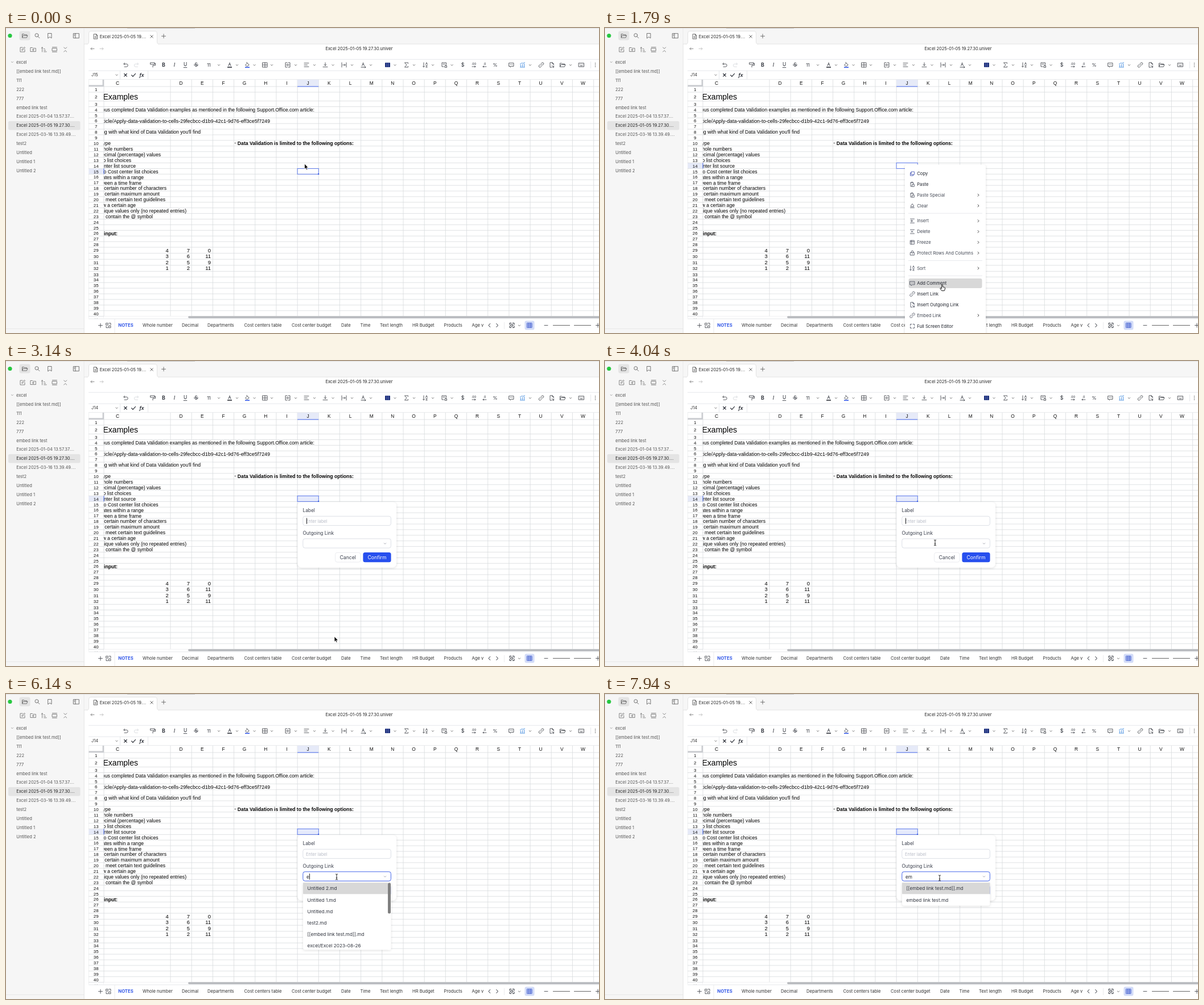
An HTML page that plays this animation: 1042 by 537 pixels, repeating every 8000 ms.

```html
<!DOCTYPE html>
<html lang="en">
<head>
<meta charset="utf-8">
<title>Outgoing link in a sheet</title>
<style>
html, body { margin: 0; width: 100%; height: 100%; overflow: hidden; background: #fff; }
svg { display: block; width: 1042px; height: 537px; font-family: Inter, sans-serif; }
text { white-space: pre; }
.cell { font-family: "Liberation Sans", Arial, sans-serif; }
</style>
</head>
<body>
<svg id="stage" viewBox="0 0 1042 537"></svg>
<script>
const BLUE = '#2f55e8', INK = '#1e222b', GREY = '#444955', GRID = '#d9dbde';

// Drawing helpers; text is placed by its vertical centre.
const text = (x, y, s, size = 7.5, fill = INK, extra = '') =>
  `<text x="${x}" y="${(y + size * 0.36).toFixed(2)}" font-size="${size}" fill="${fill}" ${extra}>${s}</text>`;
const mid = 'text-anchor="middle"', end = 'text-anchor="end"', bold = 'font-weight="700"';
const rect = (x, y, w, h, fill, extra = '') =>
  `<rect x="${x}" y="${y}" width="${w}" height="${h}" fill="${fill}" ${extra}/>`;
const path = (d, stroke = GRID, w = 0.8, extra = '') =>
  `<path d="${d}" fill="none" stroke="${stroke}" stroke-width="${w}" ${extra}/>`;
const icon = (x, y, d, stroke = '#33363d', w = 0.8) =>
  path(d, stroke, w, `transform="translate(${x} ${y})" stroke-linecap="round" stroke-linejoin="round"`);
const group = (id, body, extra = '') => `<g id="${id}" ${extra}>${body}</g>`;

const D = {
  down: 'M-1.7-.8 0 .9 1.7-.8', right: 'M-.9-2 1 0-.9 2', left: 'M1.2-3-1.5 0 1.2 3', next: 'M-1.2-3 1.5 0-1.2 3',
  cross: 'M-2.3-2.3 2.3 2.3M2.3-2.3-2.3 2.3', plus: 'M-3.5 0H3.5M0-3.5V3.5', check: 'M-3.5 0-1 2.5 3.5-2.5',
  back: 'M3 0H-3M-.8-2.2-3 0-.8 2.2', forward: 'M-3 0H3M.8-2.2 3 0 .8 2.2',
  folder: 'M-4.5 3V-3H-1.5L-.5-1.8H3.5V-.5M-4.5 3-3-.5H5L3.5 3Z',
  search: 'M2-1A3 3 0 1 1-4-1 3 3 0 0 1 2-1M1.2 1.2 4 4', mark: 'M-3-4.2H3V4.2L0 2-3 4.2Z',
  panel: 'M-4.8-4H4.8V4H-4.8ZM-1.5-4V4M-3.5-2H-2.8M-3.5 0H-2.8',
  edit: 'M0-3.8H-4V4H4V0M-1 1-.6-1 3.5-4.5 4.5-3.3.8.7Z',
  folderPlus: 'M-4.5-3.5H-1.5L-.5-2.3H4.5V3.5H-4.5ZM0-1V2.2M-1.6.6H1.6',
  order: 'M-3-4V4M-4.5-2.5-3-4-1.5-2.5M0 3.8H4.5M0 1.2H3M0-1.4H1.5',
  box: 'M-4-2.2H4V2.2H-4ZM-4-4.2H4M-4 4.2H4', fold: 'M-2.5-4 0-1.5 2.5-4M-2.5 4 0 1.5 2.5 4',
  file: 'M-3-4.2H1L3.2-2V4.2H-3ZM1-4.2V-2H3.2M-1.4 0H1.5M-1.4 2H1.5',
  undo: 'M-3.5-1.7H1.2a2.5 2.5 0 0 1 0 5H-2.5M-1.7-3.7-3.5-1.7-1.7.2', redo: 'M3.5-1.7H-1.2a2.5 2.5 0 0 0 0 5H2.5M1.7-3.7 3.5-1.7 1.7.2',
  brush: 'M-4-4H3V-1H-4ZM3-2.8H4.5V.8H0V4', bucket: 'M-3.2 0 0-3.4 3.2 0 0 2.3ZM-1.5-4.5 0-3.4',
  border: 'M-4-4H4V4H-4ZM0-4V4M-4 0H4', merge: 'M-1-4H-4V4H-1M1-4H4V4H1M-3 0H-1M3 0H1M0-2V2',
  align: 'M-4-3.2H4M-4 0H1.5M-4 3.2H4', bottom: 'M0-4V1.2M-1.8-.6 0 1.2 1.8-.6M-4 3.6H4',
  flow: 'M-4-4V4M4-4V4M-2.2 0H2.2M.8-1.4 2.2 0 .8 1.4', sum: 'M3-2.6V-4H-3L.5 0-3 4H3V2.6',
  sort: 'M-3-4V3.8M-4.3 2.4-3 3.8-1.6 2.4M.5-.8 2-4.2 3.5-.8M.7 1H3.3L.7 4H3.3',
  filter: 'M3.5-1V-4H-4V3H-1M-2-1.5H1M1 4V1.5H4.5V4ZM3-.8V1.5',
  note: 'M-4-3.3H4V2.4H0L-2 4V2.4H-4ZM-2-.5H-1.7M0-.5H.2M1.8-.5H2', chart: 'M-4 4H4M-3 3V0M0 3V-1M3 3V-2M-4-1.5-1-3.5 1-2.8 4-4.3',
  link: 'M-1 1 1.4-1.4M-.7-2 1-3.6a1.9 1.9 0 0 1 2.7 2.7L2 .8M.7 2-1 3.6a1.9 1.9 0 0 1-2.7-2.7L-2-.8',
  out: 'M0 4.2H-3V-4.2H1L3.2-2V0M1-4.2V-2H3.2M.2 1.2 3.5 4M3.5 1.8V4H1.4', keys: 'M-4.5-3.2H4.5V3.2H-4.5ZM-2.5-1H-2.2M0-1H.2M2.3-1H2.5M-2 1.4H2',
  copy: 'M-1.6-3.5H3.5V1.6H-1.6ZM-1.6-1.6H-3.5V3.5H1.6V1.6', paste: 'M-3-3H2V-.5M-3-3V3.5H-.5M-1.5-4H.6M0 0H3.3V3.8H0Z',
  clear: 'M-2.5 0 0-3.5 2.5 0V1.5H-2.5ZM-3.5 3.5H3.5', insert: 'M-3.5-3.5H3.5M-3.5 3.5H3.5M-3 0H1M-1-1.8V1.8', remove: 'M-3.5-3.5H3.5M-3.5 3.5H3.5M-2-1.2 1 1.2M1-1.2-2 1.2',
  freeze: 'M-3.3-3.3H3.3V3.3H-3.3ZM-1.2-3.3V3.3M-3.3-1.2H3.3', lock: 'M-3.3-.8H3.3V3.8H-3.3ZM-1.8-.8V-2.2a1.8 1.8 0 0 1 3.6 0V-.8M0 1V2',
  full: 'M-1.2-3.5H-3.5V-1.2M1.2-3.5H3.5V-1.2M-3.5 1.2V3.5H-1.2M3.5 1.2V3.5H1.2',
  focus: 'M-1.2-4H-4V-1.2M1.2-4H4V-1.2M-4 1.2V4H-1.2M4 1.2V4H1.2M-1.6-1.6H1.6V1.6H-1.6Z',
  sheets: 'M-4-4H-.8V-.8H-4ZM1-4H4V-.8M-4 1V4H-.8M.8.8H4V4H.8Z'
};

function sidebar() {
  const names = ['[[embed link test.md]]', '111', '222', '777', 'embed link test', 'Excel 2025-01-04 13.57.37....',
    'Excel 2025-01-05 19.27.30....', 'Excel 2025-03-16 13.39.49....', 'test2', 'Untitled', 'Untitled 1', 'Untitled 2'];
  const top = [['folder', 33], ['search', 55], ['mark', 77], ['panel', 123.5]];
  const tools = ['edit', 'folderPlus', 'order', 'box', 'fold'];
  return rect(0, 0, 137, 537, '#f6f6f6') + '<circle cx="7" cy="13.5" r="3.6" fill="#27c840"/>' +
    rect(23.5, 5.5, 19, 16, '#e4e4e4', 'rx="3"') + top.map(([k, x]) => icon(x, 13.7, D[k], '#555')).join('') +
    tools.map((k, i) => icon(29 + i * 18.8, 38, D[k], '#666')).join('') +
    icon(11, 60, D.down, '#999') + text(18, 60, 'excel', 7.5, '#555') +
    rect(4, 164, 126.5, 15.4, '#e4e4e4', 'rx="2.5"') +
    names.map((s, i) => text(18.3, 76.3 + i * 15.88, s, 7.5, i === 6 ? '#222' : '#555')).join('') +
    path('M0 529.5H137', '#e6e6e6') + path('M137.2 0V537', '#dedede');
}

function header() {
  return rect(137.6, 0, 905, 28, '#f6f6f6') +
    '<path d="M142 28.5Q145.5 28.5 145.5 24V9Q145.5 5.5 149 5.5H262Q265.5 5.5 265.5 9V24Q265.5 28.5 269 28.5" fill="#fff" stroke="#dedede" stroke-width=".8"/>' +
    path('M137 28.2H143M268 28.2H1042', '#dedede') + path('M0 .6H1042', '#dcdcdc') + path('M213 .4H332', '#b4b4b4') +
    icon(157.5, 15, D.file, '#444') + text(164.8, 15, 'Excel 2025-01-05 19....', 7.5, '#222') +
    icon(256, 15, D.cross, '#444') + icon(277, 14.3, D.plus, '#555') +
    icon(152, 36.5, D.back, '#777') + icon(168, 36.5, D.forward, '#bbb') +
    text(620.5, 36.5, 'Excel 2025-01-05 19.27.30.univer', 7.5, '#222', mid);
}

function toolbar() {
  const marks = [['undo', 210.5], ['brush', 258], ['bucket', 424], ['border', 455], ['merge', 495], ['align', 528], ['bottom', 561],
    ['flow', 594], ['sum', 703.5], ['sort', 737], ['filter', 770], ['note', 888], ['link', 940.5], ['out', 959], ['folder', 978], ['keys', 1011]];
  const arrows = [374, 406, 436.5, 467, 509, 542, 574.5, 608, 641, 683.5, 717, 750, 783.5, 921, 992];
  return path('M145 55.3H1042M145 75.2H1042M145 90.6H1042M200.5 75V90.6M249.5 75V90.6M1027.5 59V71', '#e0e2e6') +
    marks.map(([k, x]) => icon(x, 65, D[k])).join('') + icon(229, 65, D.redo, '#d4d6da') +
    arrows.map(x => icon(x, 65.3, D.down, '#555')).join('') +
    text(277, 65, 'B', 8.8, INK, mid + ' font-weight="600"') + text(296, 65, 'I', 8.8, INK, mid + ' font-style="italic"') +
    text(315, 64.3, 'U', 8.3, INK, mid) + path('M311.8 69.6H318.2', INK) +
    text(334, 65, 'S', 8.8, INK, mid) + path('M330 65H338', INK) + text(356.3, 65, '11', 7.7, INK, mid) +
    text(393, 64, 'A', 8, INK, mid) + rect(389, 68.3, 8, 1.5, INK) + rect(420, 68.5, 8, 1.6, BLUE) +
    text(627.5, 64.5, 'A', 7.5, INK, mid) + icon(628, 65, 'M-4 4H4M2.7 2.7 4 4 2.7 5.2', INK) +
    rect(666, 61, 9, 8, '#1d2f78', 'rx="1"') + path('M669 61V69M672 61V69', '#a9bbff', 0.5) +
    text(802.5, 65, '$', 8.8, INK, mid) + text(822, 63.2, '.00', 5.3, INK, mid) + icon(822, 68, 'M-3 0H3M1.5-1 3 0 1.5 1', INK, 0.7) +
    text(841, 63.2, '.0', 5.3, INK, mid) + icon(841, 68, 'M3 0H-3M-1.5-1-3 0-1.5 1', INK, 0.7) + text(859.5, 65, '%', 8.2, INK, mid) +
    icon(907.5, 65, D.chart, '#2479d8') +
    [-3, 0, 3].map(d => `<circle cx="1035.5" cy="${65 + d}" r=".7" fill="#444"/>`).join('') +
    icon(194.5, 82.8, D.down, '#555') + icon(210, 82.8, D.cross, INK, 1.1) + icon(224, 82.8, D.check, INK, 1.1) +
    text(238.5, 82.6, '<tspan font-style="italic" font-weight="600">fx</tspan>', 8.5, INK, mid);
}

// Row n spans rowTop(n)..rowTop(n + 1).
const STEP = 9.9, COL = 37.18;
const rowTop = n => n < 2 ? 103 : n < 3 ? 113 : n < 4 ? 128.5 : n <= 29 ? 138.5 + (n - 4) * STEP :
  n <= 33 ? 386 + (n - 29) * 10.6 : 428.4 + (n - 33) * STEP;
const rowMid = n => (rowTop(n) + rowTop(n + 1)) / 2 + 0.3;
const colLeft = i => 289 + i * COL;

function sheet() {
  const notes = [[4, 542, 'various completed Data Validation examples as mentioned in the following Support.Office.com article:'],
    [6, 464, 'article/Apply-data-validation-to-cells-29fecbcc-d1b9-42c1-9d76-eff3ce5f7249', 8.92],
    [8, 342, "along with what kind of Data Validation you'll find"], [10, 184, 'Type'], [11, 223, 'Whole numbers'],
    [12, 272, 'Decimal (percentage) values'], [13, 220, 'to list choices'], [14, 228, 'center list source'],
    [15, 267.5, 'to Cost center list choices'], [16, 242, 'Dates within a range'], [17, 238, 'between a time frame'],
    [18, 282, 'a certain number of characters'], [19, 270, 'a certain maximum amount'], [20, 280, 'to meet certain text guidelines'],
    [21, 228, 'below a certain age'], [22, 317, 'Unique values only (no repeated entries)'], [23, 258, 'to contain the @ symbol']];
  const overflow = [[4, 280, 549], [6, 280, 474.5], [8, 280, 363], [10, 402, 623], [22, 280, 326]];
  const table = [[4, 7, 0], [3, 6, 11], [2, 5, 9], [1, 2, 11]];
  let lines = '', heads = '', body = '';
  for (let n = 1; n < 42; n++) {
    lines += `M145 ${rowTop(n).toFixed(1)}H1042`;
    heads += text(158.3, rowMid(n), n, 8, '#111', mid);
  }
  for (let i = 0; i < 21; i++) {
    lines += `M${colLeft(i).toFixed(1)} 91V508`;
    if (i < 20) heads += text(colLeft(i) + COL / 2, 97.3, String.fromCharCode(68 + i), 8.4, '#111', mid);
  }
  body += overflow.map(([n, a, b]) => rect(a, rowTop(n) + 0.5, b - a, STEP - 1, '#fff')).join('');
  body += text(232, 121, 'Examples', 14, '#000', end);
  body += notes.map(([n, x, s, size = 8.65]) => text(x, rowMid(n), s, size, '#000', end)).join('');
  body += text(611, rowMid(10), '· Data Validation is limited to the following options:', 8.65, '#000', end + bold);
  body += text(196, rowMid(26), 'input:', 8.65, '#000', end + bold);
  table.forEach((r, i) => r.forEach((v, j) => body += text(285.7 + j * COL, rowMid(29 + i) - 0.3, v, 9.4, '#000', end)));
  return '<clipPath id="view"><rect x="172" y="91" width="870" height="417"/></clipPath>' +
    '<clipPath id="sheetBox"><rect x="145" y="91" width="897" height="420.5"/></clipPath>' +
    `<g class="cell" clip-path="url(#sheetBox)">` + path(lines + 'M172 91V511M145 91V511') +
    rect(colLeft(6), 91, COL, 12, '#e6eaf8') + path(`M${colLeft(6)} 103H${colLeft(7)}`, BLUE, 0.9) +
    rect(145.4, 100.4, 26.6, 2.6, '#c9cbcf') + rect(169.6, 91, 2.4, 12, '#c9cbcf') +
    heads + text(196, 97.3, 'C', 8.4, '#111', mid) + `<g clip-path="url(#view)">${body}</g></g>` +
    rect(172, 507.5, 870, 4, '#fff') + rect(320, 507.3, 730, 3.6, '#b9bbbf', 'rx="1.8"');
}

function selection(n) {
  const y = rowTop(n), x = colLeft(6);
  return group('row' + n, rect(145.4, y + 0.4, 26.2, STEP - 0.8, '#e6eaf8') + path(`M172 ${y}v${STEP}`, BLUE, 0.9) +
    text(158.3, rowMid(n), n, 8, '#111', mid + ' class="cell"') +
    rect(x, y, COL, STEP, n === 14 ? 'var(--tint)' : 'none', `stroke="#4f6ee9" stroke-width=".9"`) +
    rect(x + COL - 1.2, y + STEP - 1.2, 2.1, 2.1, BLUE) + text(150, 82.8, 'J' + n, 7.4, '#333'));
}

function footer() {
  const tabs = [[240, 'Whole number'], [309, 'Decimal'], [354, 'Departments'], [418.5, 'Cost centers table'], [502, 'Cost center budget'],
    [589, 'Date'], [622.5, 'Time'], [657, 'Text length'], [714, 'HR Budget'], [769.5, 'Products'], [818.5, 'Age validation']];
  return rect(145, 511.6, 897, 26, '#fff') + path('M145 512H1042', '#e0e2e6') + path('M191 512V537M875.5 518V530', '#e6e7ea') +
    icon(166, 523.7, D.plus) + icon(180, 523.7, D.sheets) + text(210.5, 523.7, 'NOTES', 7.7, BLUE, mid + bold) +
    '<clipPath id="tabs"><rect x="191" y="512" width="648" height="25"/></clipPath>' +
    `<g clip-path="url(#tabs)">${tabs.map(([x, s]) => text(x, 523.7, s, 7.65, '#333')).join('')}</g>` +
    icon(849.5, 523.5, D.left, INK, 1) + icon(863, 523.5, D.next, INK, 1) + icon(889, 523.5, D.focus, INK, 0.9) +
    icon(902, 523.8, D.down, '#555') + rect(911.5, 515.5, 17, 16, '#d3dcf8', 'rx="3"') +
    icon(920, 523.5, 'M-4-4H4V4H-4ZM-4-1.4H4M-4 1.4H4M-1.4-4V4M1.4-4V4', '#2a49c8') +
    icon(949, 523.5, 'M-3 0H3') + path('M961 523.5H991M998 523.5H1028', '#666', 1) + icon(1040, 523.5, D.plus);
}

const ITEMS = [['Copy', 256.5, 'copy'], ['Paste', 275.3, 'paste'], ['Paste Special', 294.2, 'paste', 1], ['Clear', 313, 'clear', 1],
  ['Insert', 339.7, 'insert', 1], ['Delete', 358.5, 'remove', 1], ['Freeze', 377.4, 'freeze', 1], ['Protect Rows And Columns', 396.2, 'lock', 1],
  ['Sort', 422.9, 'sort', 1], ['Add Comment', 449.5, 'note'], ['Insert Link', 468.3, 'link'], ['Insert Outgoing Link', 487.2, 'out'],
  ['Embed Link', 506, 'link', 1], ['Full Screen Editor', 524.9, 'full']];

const panel = 'style="filter:drop-shadow(0 1px 2px rgba(0,0,0,.13))"';

function menu() {
  return group('menu', rect(527, 240.6, 142, 330, '#fff', 'rx="4" ' + panel) +
    rect(533.5, 0, 129, 17, '#d8d8d8', 'id="hover" rx="3"') +
    path('M533 326.3H663M533 409.5H663M533 436.2H663M533 540H663', '#e3e5ea') +
    ITEMS.map(([s, y, k, sub]) => icon(540, y, D[k], k === 'copy' ? '#3b4cb0' : '#3d4252') +
      text(548.2, y, s, 7.7, sub ? GREY : INK) + (sub ? icon(656, y, D.right, '#333', 0.9) : '')).join(''));
}

const field = (y, stroke, id = '') => rect(521.8, y, 154.6, 16.3, '#fff', `${id} rx="3.5" stroke="${stroke}" stroke-width=".9"`);

function dialog() {
  return group('dialog', rect(512.3, 248.2, 173.8, 115.6, '#fff', 'rx="7" ' + panel) +
    text(521.5, 262.8, 'Label', 8.3, '#3a3f4c') + field(273.3, '#d9dce4') + text(527, 281.8, 'Enter label', 7.5, '#b8bcc7') +
    text(521.5, 302.8, 'Outgoing Link', 8.3, '#3a3f4c') + field(312.9, '#d9dce4', 'id="select"') + icon(666, 321.4, D.down, '#9a9fab', 0.9) +
    rect(578.5, 337.3, 44.5, 16.8, '#fff', 'rx="3.5" stroke="#e6e8ed" stroke-width=".8"') + text(600.7, 346, 'Cancel', 8.7, '#3a3f4c', mid) +
    rect(627.4, 336.9, 49.2, 17.4, '#274fee', 'rx="3.5"') + text(652, 346, 'Confirm', 8.7, '#fff', mid) +
    text(528, 321.6, '', 8.2, INK, 'id="typed"') + rect(0, 0, 0.9, 10.5, '#111', 'id="caret"'));
}

const ALL = ['Untitled 2.md', 'Untitled 1.md', 'Untitled.md', 'test2.md', '[[embed link test.md]].md', 'excel/Excel 2023-08-26'];

function list(id, names, h) {
  return group(id, rect(522, 332, 154.4, h, '#fff', 'rx="4" ' + panel) + rect(522, 332.3, 154.4, 20, '#d8d8d8', 'rx="1"') +
    names.map((s, i) => text(529.6, 342.5 + i * 20.15, s, 8.2, '#30343e')).join('') +
    (id === 'all' ? rect(671, 332, 5.4, h, '#fff') + rect(671, 332.5, 5, 43, '#808080', 'id="thumb" rx="2"') : ''));
}

const pointer = (id, d, extra) => `<path id="${id}" d="${d}" ${extra}/>`;
const cursors = pointer('arrow', 'M0 0V9.4L2.1 7.5 3.6 10.8 5.2 10.1 3.7 6.9H6.6Z', 'fill="#000" stroke="#fff" stroke-width=".8"') +
  pointer('hand', 'M-.9 .8a.9.9 0 0 1 1.8 0V4l3.3.8q1 .3.9 1.4L4.5 9.2 3.8 10.8H-.8L-3.4 7.2q-.7-1 .3-1.5l.5 0 1.7 1.4Z', 'fill="#fff" stroke="#000" stroke-width=".9" stroke-linejoin="round"') +
  pointer('beam', 'M-2-5Q0-5 0-3.8Q0-5 2-5M0-3.8V3.8M-2 5Q0 5 0 3.8Q0 5 2 5M-1.2 1.8H1.2', 'fill="none" stroke="#111" stroke-width=".9"');

document.getElementById('stage').innerHTML = rect(0, 0, 1042, 537, '#fff') + sidebar() + header() + toolbar() + sheet() +
  selection(15) + selection(14) + footer() + menu() + dialog() + list('all', ALL, 118.5) +
  list('few', ['[[embed link test.md]].md', 'embed link test.md'], 40.8) + cursors;

// Each step changes only what it names; values hold until the next step.
const STEPS = [
  [0, { row: 15, menu: 0, hover: -1, dialog: 0, list: '', caret: 0, typed: '', thumb: 43, cur: ['arrow', 524.6, 239] }],
  [600, { row: 14 }],
  [1190, { menu: 0.968 }],
  [1340, { menu: 1, cur: ['arrow', 528, 249] }],
  [1490, { hover: 4, cur: ['hand', 559, 337] }],
  [1640, { hover: 8, cur: ['hand', 583, 420] }],
  [1790, { hover: 9, cur: ['hand', 592.5, 451.8] }],
  [1940, { hover: 10, cur: ['hand', 586, 470] }],
  [2090, { hover: -1, cur: ['hand', 578.5, 486] }],
  [2240, { hover: 11 }],
  [3140, { menu: 0, dialog: 1, caret: 1, cur: ['arrow', 577, 485] }],
  [3440, { cur: ['arrow', 577, 472] }],
  [3590, { caret: 0, cur: ['arrow', 577, 430] }],
  [3740, { cur: ['arrow', 577, 378] }],
  [3890, { cur: ['arrow', 579, 338] }],
  [4040, { caret: 1, cur: ['beam', 580, 320] }],
  [4190, { list: 'all', cur: ['beam', 581, 317] }],
  [4940, { caret: 0 }],
  [5240, { cur: ['beam', 581, 320] }],
  [5390, { caret: 1, cur: ['beam', 581, 322] }],
  [5840, { caret: 0 }],
  [6140, { caret: 1, typed: 'e', thumb: 54 }],
  [6290, { cur: ['beam', 586, 322] }],
  [6440, { cur: ['beam', 588, 322.8] }],
  [6590, { caret: 0 }],
  [7040, { caret: 1 }],
  [7340, { typed: 'em', list: 'few' }],
  [7940, { caret: 0, cur: ['beam', 588, 324] }]
];

const el = id => document.getElementById(id);
const show = (id, on) => { el(id).style.display = on ? '' : 'none'; };
const set = (id, attrs) => { for (const k in attrs) el(id).setAttribute(k, attrs[k]); };
const CARET = { '': 528, e: 533.1, em: 540.4 };

function draw(s) {
  show('row15', s.row === 15);
  show('row14', s.row === 14);
  el('stage').style.setProperty('--tint', s.dialog ? '#e5eafc' : '#fff');
  show('menu', s.menu);
  set('menu', { transform: `translate(0 ${240.6 * (1 - s.menu)}) scale(1 ${s.menu || 1})` });
  show('hover', s.hover >= 0);
  if (s.hover >= 0) set('hover', { y: ITEMS[s.hover][1] - 8.5 });
  show('dialog', s.dialog);
  set('select', { stroke: s.list ? BLUE : '#d9dce4' });
  show('all', s.list === 'all');
  show('few', s.list === 'few');
  set('thumb', { height: s.thumb });
  el('typed').textContent = s.typed;
  show('caret', s.caret);
  set('caret', { x: CARET[s.typed], y: s.list ? 316.2 : 276.4 });
  const [kind, x, y] = s.cur;
  for (const k of ['arrow', 'hand', 'beam']) show(k, k === kind);
  set(kind, { transform: `translate(${x} ${y})` });
}

const start = performance.now();
let last = -1;
function tick() {
  const t = (performance.now() - start) % 8000;
  const past = STEPS.filter(([at]) => at <= t);
  if (past.length !== last) {
    last = past.length;
    draw(Object.assign({}, ...past.map(p => p[1])));
  }
  requestAnimationFrame(tick);
}
tick();
</script>
</body>
</html>
```
